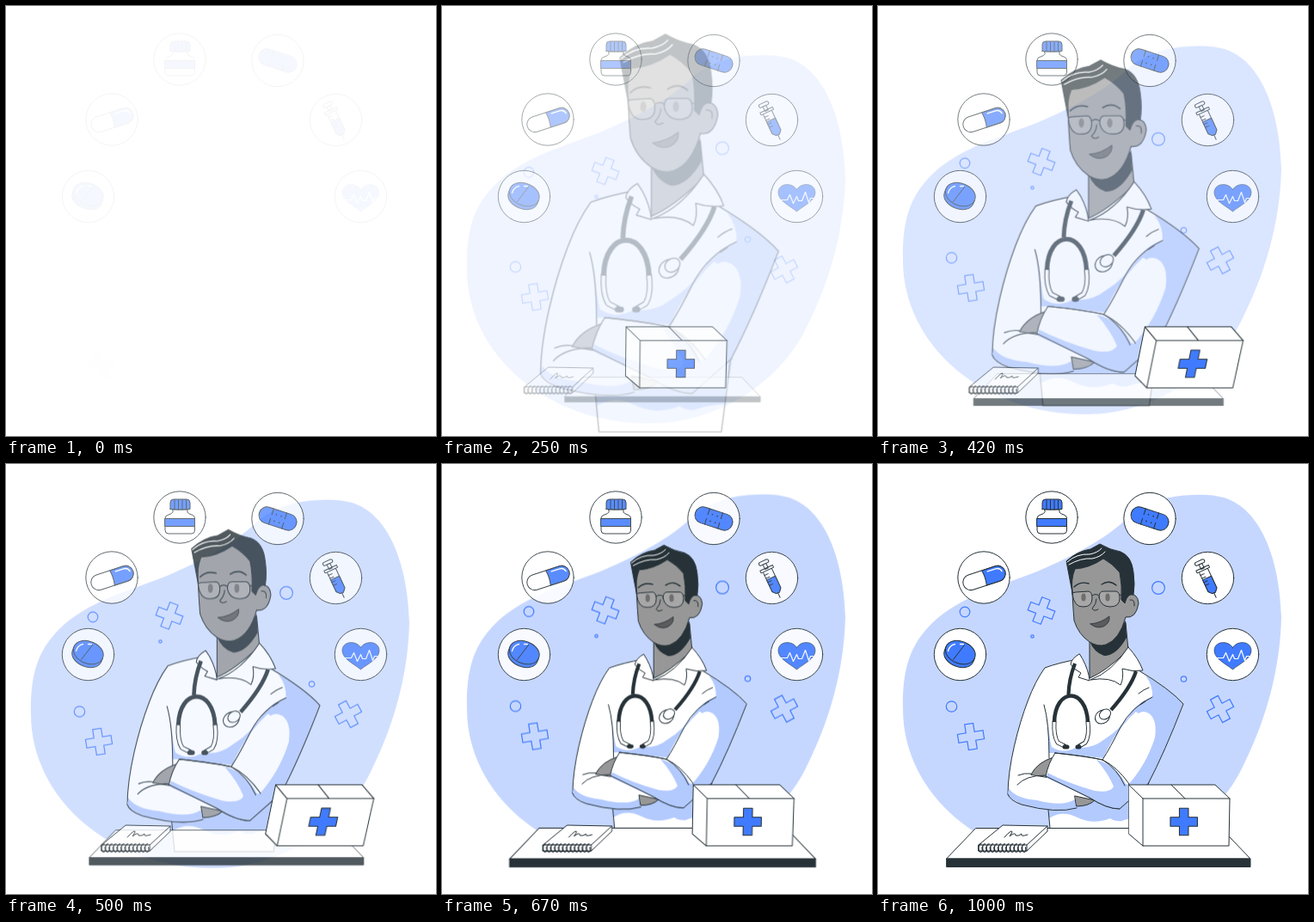
Animation of 500 by 500 pixels, one loop 1.04 s. Source, as an HTML page:

```html
<!DOCTYPE html>
<html lang="en">
<head>
<meta charset="utf-8">
<title>Doctor at the desk</title>
<style>
html, body { margin: 0; width: 100%; height: 100%; overflow: hidden; background: #fff; }
svg { display: block; width: 100vw; height: 100vh; }
.ink { fill: none; stroke: #263238; stroke-width: 1; stroke-linecap: round; stroke-linejoin: round; }
.ink .w, .w { fill: #fff; }
.b { fill: #407bff; }
.s { fill: #b3caff; stroke: none; }
.k { fill: #263238; }
.skin { fill: #979797; }
.hi { fill: none; stroke: #fff; }
.none { stroke: none; }
.blue { fill: none; stroke: #407bff; stroke-width: 1.2; }
#doctor { transform-origin: 253px 262px; }
#desk { transform-origin: 256.5px 446px; }
#box { transform-origin: 350px 409px; }
</style>
</head>
<body>
<svg viewBox="0 0 500 500">
  <defs>
    <path id="plus" d="M-5-15H5V-5H15V5H5V15H-5V5H-15V-5H-5Z"/>
  </defs>

  <g id="back">
    <path fill="#c6d7ff" d="M29 285C28 237 38 210 62 186C95 153 148 140 185 125C235 104 272 82 294 59C313 45 338 36 366 36C378 35 392 36 402 39C445 52 467 110 469 178C468 230 455 290 425 350C395 415 320 465 240 464C123 464 29 384 29 285Z"/>
    <g class="blue">
      <use href="#plus" transform="translate(190 170.5) rotate(21)"/>
      <use href="#plus" transform="translate(108 317) rotate(-9)"/>
      <use href="#plus" transform="translate(398 285) rotate(62)"/>
      <circle cx="101" cy="172" r="5.8"/>
      <circle cx="326" cy="144" r="7.4"/>
      <circle cx="85.5" cy="282" r="6.2"/>
      <circle cx="355.5" cy="250" r="3.2"/>
      <circle cx="179.5" cy="200.5" r="1.7"/>
    </g>
  </g>

  <g id="icons" class="ink">
    <g transform="translate(202 62)">
      <circle class="w" r="30.2"/>
      <path class="w" d="M-8-9H9V-6Q10-4 14-3Q17.500-2 17.500 1V15Q17.500 19 14 19H-13Q-17 19-17 15V1Q-17-2-13-3Q-9-4-8-6Z"/>
      <path class="b" d="M-17 1.500H17.500V10.500H-17ZM-11-9.500V-17Q-11-21-7-21H8Q12-21 12-17V-9.500Q0-8.500-11-9.500Z"/>
      <path d="M-6-20V-10M-1.500-20V-9M3-20V-9M7.500-20V-10"/>
    </g>
    <g transform="translate(316 63.500)">
      <circle class="w" r="30.2"/>
      <g transform="rotate(18)">
        <rect class="b" x="-22.500" y="-9.500" width="45" height="19" rx="9"/>
        <path d="M-8-9.500V9.500M8-9.500V9.500" stroke-dasharray="7 5"/>
        <path d="M-3-4h.1M3-4h.1M-3 4h.1M3 4h.1" stroke-width="1.600"/>
      </g>
    </g>
    <g transform="translate(123 132)">
      <circle class="w" r="30.2"/>
      <g transform="translate(.5 .5) rotate(-18)">
        <rect class="w" x="-25.500" y="-9" width="51" height="18" rx="9"/>
        <path class="b" d="M0-9H16.500A9 9 0 0 1 16.500 9H0Q2 0 0-9Z"/>
        <path class="hi" d="M6-6H16Q21-6 22-1" stroke-width="1.400"/>
      </g>
    </g>
    <g transform="translate(383.500 132.500)">
      <circle class="w" r="30.2"/>
      <g transform="translate(-.5 1) rotate(-25)">
        <rect class="w" x="-6" y="-23" width="12" height="4" rx="2"/>
        <path class="w" d="M-2-19H2V-13H-2ZM-8-14H8V-11H-8ZM-5.500-11H5.500V14L2 18H-2L-5.500 14Z"/>
        <path class="b" d="M-5.500-1H5.500V14L2 18H-2L-5.500 14Z"/>
        <path d="M0 18V24M-5.500-7H-1M-5.500-3H-1M-5.500 2H-1M-5.500 6H-1"/>
      </g>
    </g>
    <g transform="translate(95.500 221.500)">
      <circle class="w" r="30.2"/>
      <g transform="translate(-.5 -.5) rotate(22)">
        <path class="b" d="M-18-2C-18-19 18-19 18-2V2C18 19-18 19-18 2Z"/>
        <path d="M-18-2C-17 15 17 15 18-2"/>
      </g>
      <path d="M-8 6L5-11"/>
      <path class="hi" d="M-14-4Q-12-11-6-12M0-12L4-12" stroke-width="1.300"/>
    </g>
    <g transform="translate(412.500 221.500)">
      <circle class="w" r="30.2"/>
      <path class="b" stroke-width=".6" d="M0-8C-5-17-22-16-21.500-4C-21 5-8 11 0 17.500C8 11 21 5 21.500-4C22-16 5-17 0-8Z"/>
      <path class="hi" d="M-19 4H-11L-8-2L-4 8L0 0L2 5H6L10-5L14 7L16 2H19" stroke-width="1.200"/>
    </g>
  </g>

  <g id="doctor" class="ink">
    <!-- coat body -->
    <path class="w none" d="M233 227Q210 231 194 237Q183 252 174 276C163 305 151 350 151 384Q153 391 165 395L198 402L201 434H306L314 372Q333 336 355 279Q340 262 303 240L292 212L247 250Z"/>
    <path class="s" d="M198 402L250 390L314 372L309 410Q290 412 284 415Q276 416 270 412Q250 420 232 411Q214 402 199 412Z"/>
    <path class="s" d="M311 246Q342 263 354.500 279Q332 338 315 371L281 401Q266 401 252 391L260 384Q277 384 290 374Q312 350 322 318Q325 297 315 290Q308 286 303 290L297 286Q306 275 319 271Q320 258 311 246Z"/>
    <path class="s" d="M197 291Q199 320 202 329Q216 338 231 329Q248 332 262 321Q282 309 296 287Q306 276 318 273Q280 300 262 342L206 336L199 336Z"/>
    <path d="M233 227Q210 231 194 237Q183 252 174 276C163 305 151 350 151 384M303 240Q340 262 355 279Q333 336 314 372L306 434H201L198 402"/>
    <path d="M193 280Q199 300 199 342M319 271Q295 282 282 306Q270 330 261 344"/>

    <!-- head and neck -->
    <path class="skin" d="M246 200L246 249Q264 242 291 216L288 185Z"/>
    <path class="k none" d="M246 206Q264 216 288 182L289 202Q277 223 263 223Q251 219 246 206Z"/>
    <path class="skin" d="M225 125Q226 157 228 182Q233 198 246 207Q256 213 265 210Q281 204 288 178Q300 180 303 162Q302 149 290 152L284 110Q246 100 225 125Z"/>
    <path class="k" d="M226 150L219 113Q232 101 247 99L258 93Q270 100 282 102Q295 107 297 126Q299 140 297 152Q290 150 287 162L283 158Q284 140 281 126Q273 116 262 110Q246 121 229 122Q224 134 226 150Z"/>
    <path class="hi" d="M220 114Q231 104 246 105Q256 103 260 98M222 117Q236 109 249 110Q259 108 264 102"/>
    <path d="M228 143Q235 136 245 139M260 140Q269 134 277 141" stroke-width="1.400"/>
    <ellipse class="none" fill="#555" cx="239" cy="155" rx="2.600" ry="4.600"/>
    <ellipse class="none" fill="#555" cx="267" cy="155" rx="2.600" ry="4.600"/>
    <path fill="#fff" fill-opacity=".15" d="M226 151Q226 149 230 149L245 148Q249 149 249 156Q249 166 239 166Q228 167 226 151ZM257 155Q257 148 262 148H277Q281 149 281 156Q281 166 270 166Q259 166 257 155Z"/>
    <path d="M249 153Q253 150 257 153M281 152L289 154"/>
    <path d="M254 157Q254 163 249 168Q251 172 256 169M293 158Q299 157 298 165"/>
    <path fill="#5c5c5c" stroke-width=".8" d="M247 186Q259 185 269 177Q270 185 262 189Q254 192 247 186Z"/>

    <!-- collar -->
    <path class="w" d="M234 221Q225 226 224 233Q228 239 236 243L233 248L246 252Q245 240 238 227Z"/>
    <path class="w" d="M291 213Q303 226 308 240Q296 242 284 238Q286 249 282 257Q270 247 247 251Q272 242 291 213Z"/>
    <path d="M303 267Q309 262 315 260M311 276L305 280"/>

    <!-- stethoscope -->
    <path d="M229 232Q222 250 221.500 268M300 241Q294 260 271 286" stroke-width="4.200" stroke-linecap="butt"/>
    <path d="M205 300Q204 316 209 324L217 328M244 300Q246 316 241 324L234 328" stroke-width="5"/>
    <path class="hi" d="M205 300Q204 316 209 324L215 327M244 300Q246 316 241 324L236 327" stroke-width="3.200"/>
    <path d="M205 300C206 260 242 259 244 300" stroke-width="4.500" stroke-linecap="butt"/>
    <path d="M217 329H220M232 329H234" stroke-width="5"/>
    <ellipse class="w" cx="261" cy="294" rx="9" ry="7.500" transform="rotate(-35 261 294)"/>
    <ellipse class="w" cx="264" cy="291" rx="7" ry="5.500" transform="rotate(-35 264 291)"/>

    <!-- crossed arms -->
    <path class="w none" d="M163 362Q176 357 195 364L229 380L231 400Q208 407 167 396L151 386Q153 368 163 362Z"/>
    <path class="s" d="M152 377Q160 389 185 391Q215 399 229 390L231 400Q208 407 167 396L151 387Z"/>
    <path d="M151 384Q153 391 167 396Q208 407 231 400"/>
    <path class="skin" d="M178 361Q185 347 204 341L196 364Z"/>
    <path class="skin" d="M229 386L252 391Q245 398 231 398Z"/>
    <path d="M162 373Q172 362 194 362M163 362Q170 359 178 360"/>
    <path class="w" d="M206 336Q244 340 261 344Q278 352 292 372L281 401Q266 401 246 388L195 363Q198 348 206 336Z"/>
    <path class="s" d="M254 344Q277 350 288 372Q300 376 314 372L281 401Q266 401 250 390L196 365L197 359Q220 371 252 380Q270 383 274 375Q268 360 254 344Z"/>
    <path d="M206 336Q244 340 261 344Q278 354 287 374M195 363L246 388Q266 401 281 401L315 371"/>
  </g>

  <g id="desk" class="ink">
    <path class="w" d="M114 423.500H399L433 459H80Z"/>
    <path class="k" d="M80 459H433V468.500H80Z"/>
  </g>

  <g id="pad" class="ink">
    <path class="w" d="M117 443L145 420L197 421V427L173 450H117Z"/>
    <path d="M117 443L173 443L197 421M173 443V450"/>
    <path d="M147 434Q156 424 156 428L153 433Q160 427 160 432Q164 433 167 430Q165 434 174 431"/>
    <path id="rings" stroke-width="1.300"/>
  </g>

  <g id="box" class="ink">
    <path class="w" d="M291.500 373H392L409 389L408 444H308L291.500 430Z"/>
    <path d="M291.500 373L308 389H409M308 389V444M341 373L357 389"/>
    <use class="b" href="#plus" transform="translate(355.700 416) scale(1.050)"/>
  </g>
</svg>

<script>
const LOOP = 1040, FRAME = 1000 / 24, LEAD = 33;
const spring = 'cubic-bezier(.36,-.01,.5,1.38)';

// Spiral binding along the lower edge of the pad
let rings = '';
for (let x = 120; x < 175; x += 4.6) rings += `M${x} 442C${x - 4} 441 ${x - 4} 452 ${x} 451Q${x + 2} 450 ${x + 1} 446`;
document.getElementById('rings').setAttribute('d', rings);

const players = [];

function play(id, frames, easing = spring) {
  const player = document.getElementById(id).animate(
    frames.map(frame => ({ easing, ...frame })), { duration: 1000, fill: 'both' });
  player.pause();
  players.push(player);
}

const enter = (id, transform, rest) =>
  play(id, [{ opacity: 0, transform }, { opacity: 1, transform: rest }]);

enter('back', 'translateY(30px)', 'translateY(0px)');
enter('doctor', 'scale(1.5)', 'scale(1)');
enter('desk', 'scale(.5)', 'scale(1)');
enter('pad', 'translateX(-30px)', 'translateX(0px)');
play('icons', [{ opacity: 0 }, { opacity: 1 }], 'ease-out');
play('box', [
  { offset: 0, opacity: 0, transform: 'translateX(-250px) skewX(20deg)' },
  { offset: .6, opacity: 1, transform: 'translateX(0px) skewX(-10deg)' },
  { offset: .8, opacity: 1, transform: 'translateX(0px) skewX(2deg)' },
  { offset: 1, opacity: 1, transform: 'translateX(0px) skewX(0deg)' }
]);

function tick() {
  const step = Math.floor((performance.now() % LOOP + 5) / FRAME);
  const time = Math.min(step * FRAME + LEAD, 1000);
  for (const player of players) player.currentTime = time;
  requestAnimationFrame(tick);
}
tick();
</script>
</body>
</html>
```
